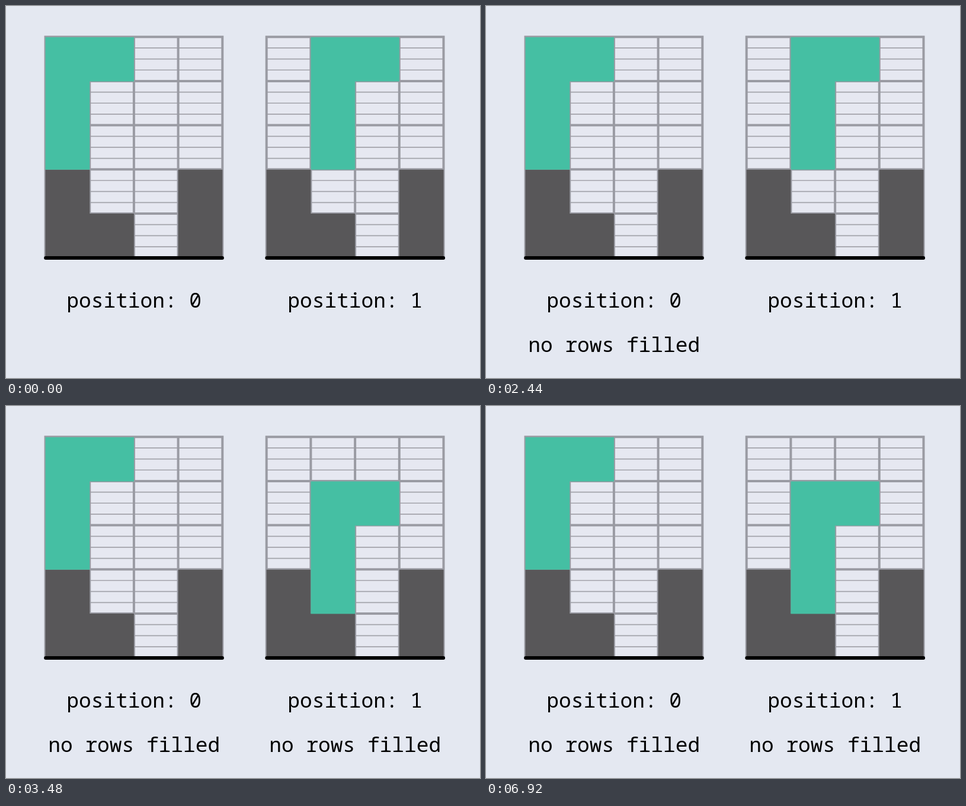
Animation of 800 by 629 pixels, one loop 7 s. Source, as an HTML page:

```html
<!DOCTYPE html>
<html lang="en">
<head>
<meta charset="utf-8">
<title>Dropping a piece</title>
<style>
  html, body { margin: 0; width: 100%; height: 100%; overflow: hidden; background: #e4e8f1; }
  svg { display: block; width: 100vw; height: 100vh; }
  text {
    font: 34.5px "Noto Sans Mono", "DejaVu Sans Mono", monospace;
    text-anchor: middle;
    fill: #000;
  }
  .piece { fill: #45bfa3; }
  .stack { fill: #585759; }
  .drop { animation: drop 7s step-end infinite; }
  .first { animation: first 7s step-end infinite; }
  .second { animation: second 7s step-end infinite; }
  /* hard changes at 1880 ms and 3480 ms */
  @keyframes drop {
    0% { transform: translateY(0); }
    49.714%, 100% { transform: translateY(74.7px); }
  }
  @keyframes first {
    0% { visibility: hidden; }
    26.857%, 100% { visibility: visible; }
  }
  @keyframes second {
    0% { visibility: hidden; }
    49.714%, 100% { visibility: visible; }
  }
</style>
</head>
<body>
<svg viewBox="0 0 800 629">
  <defs>
    <!-- cells are 74.7 wide, each split into four slots -->
    <g id="grid" fill="none" stroke="#9a9ba3">
      <rect width="298.8" height="373.5" fill="#e6e8f1" stroke="none"/>
      <path d="M149.4 0V373.5" stroke="#a2a3aa" stroke-width="298.8"
            stroke-dasharray="1.7 16.975" stroke-dashoffset=".85"/>
      <path d="M0 0H298.8V373.5H0ZM74.7 0V373.5M149.4 0V373.5M224.1 0V373.5
               M0 74.7H298.8M0 149.4H298.8M0 224.1H298.8M0 298.8H298.8" stroke-width="4"/>
    </g>
    <path id="stack" class="stack" d="M0 224.5H74.7V298.8H149.4V373.5H0ZM224.1 224.5H298.8V373.5H224.1Z"/>
    <path id="piece" class="piece" d="M0 .6H149.4V75.2H74.7V224.5H0Z"/>
    <path id="floor" d="M.6 373.8H298.4" stroke="#000" stroke-width="6" stroke-linecap="round"/>
  </defs>

  <g transform="translate(66.5 52.2)">
    <use href="#grid"/>
    <use href="#stack"/>
    <use href="#piece"/>
    <use href="#floor"/>
    <text x="149.7" y="457.8">position: 0</text>
    <text class="first" x="149.7" y="532.6">no rows filled</text>
  </g>

  <g transform="translate(439.7 52.2)">
    <use href="#grid"/>
    <use href="#stack"/>
    <g class="drop"><use href="#piece" x="74.7"/></g>
    <use href="#floor"/>
    <text x="149.5" y="457.8">position: 1</text>
    <text class="second" x="149.5" y="532.6">no rows filled</text>
  </g>
</svg>
</body>
</html>
```
